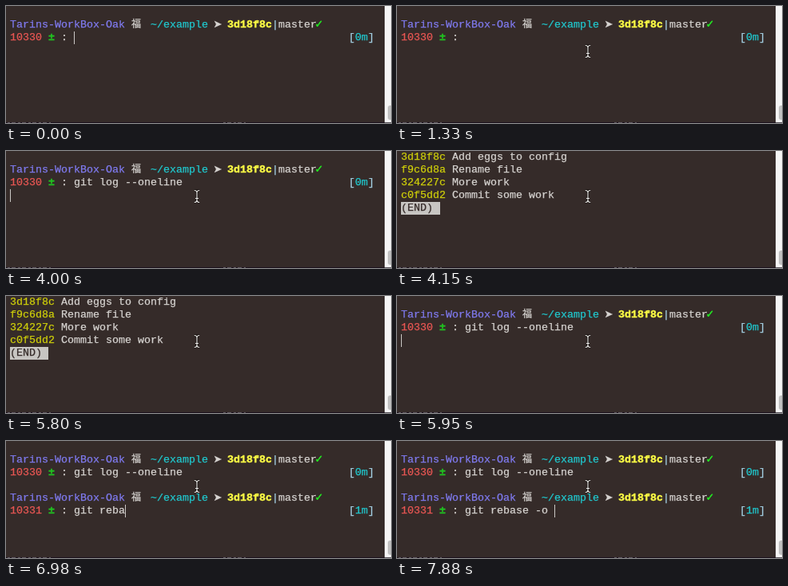
An HTML page that plays this animation: 482x147 px, repeating every 8000 ms.

```html
<!DOCTYPE html>
<html lang="en">
<head>
<meta charset="utf-8">
<title>Terminal session</title>
<style>
  html, body { margin: 0; width: 100%; height: 100%; overflow: hidden; background: #352b29; }
  svg { display: block; width: 482px; height: 147px; }
  text {
    font: 13.333px "Liberation Mono", "Courier New", monospace;
    white-space: pre;
    fill: currentColor;
    stroke: currentColor;
    stroke-width: .25px;
  }
  .bold { font-weight: bold; stroke-width: .4px; }
  .symbol { font: 13px "DejaVu Sans", sans-serif; }
  .cjk { font: 12px "Noto Sans CJK JP", "Noto Sans CJK SC", "Noto Sans CJK", sans-serif; }
</style>
</head>
<body>
<svg viewBox="0 0 482 147">
  <defs>
    <path id="beam" d="M235.8 49.5q3.2 0 3.2 3v9q0 3-3.2 3M242.2 49.5q-3.2 0-3.2 3v9q0 3 3.2 3M237 59.5h4"/>
  </defs>
  <rect width="482" height="147" fill="#352b29"/>
  <g id="screen"></g>
  <rect id="caret" width="1" height="16" fill="#cbc8c5"/>
  <g id="mouse" fill="none">
    <use href="#beam" stroke="#181311" stroke-width="2.8"/>
    <use href="#beam" stroke="#f2f0ee" stroke-width="1.1"/>
  </g>
  <rect y="146" width="474" height="1" fill="#1b111d"/>
  <path d="M2 146.5h54M272 146.5h28" stroke="#5d5660" stroke-dasharray="3 2 5 3"/>
  <rect x="474" width="8" height="147" fill="#f5f5f5"/>
  <rect x="474" width="1" height="147" fill="#e4e3e3"/>
  <rect x="478" y="125" width="8" height="18" rx="3" fill="#c1c1c1"/>
  <rect x="474" y="146" width="8" height="1" fill="#5a555b"/>
</svg>
<script>
const LOOP = 8000, CELL = 8, LINE = 16, LEFT = 5;
const INK = '#d6d3d0', CYAN = '#20c8ce', PALE = '#a5d3e6', HASH = '#cdcd0a';
const FIRST = 'git log --oneline', SECOND = 'git rebase -o ';
const LOG = [
  ['3d18f8c', 'Add eggs to config'],
  ['f9c6d8a', 'Rename file'],
  ['324227c', 'More work'],
  ['c0f5dd2', 'Commit some work']
];
// [time, characters typed]
const TYPE_FIRST = [[2230, 1], [2380, 3], [2530, 4], [2660, 6], [2810, 8], [2960, 10],
  [3260, 12], [3410, 14], [3560, 16], [3700, 17]];
const TYPE_SECOND = [[6390, 1], [6540, 3], [6690, 4], [6840, 6], [6980, 8], [7130, 10],
  [7280, 11], [7580, 12], [7880, 14]];

const byId = id => document.getElementById(id);
const screen = byId('screen'), caret = byId('caret'), mouse = byId('mouse');

function typed(text, steps, t) {
  const done = steps.filter(([at]) => at <= t).pop();
  return text.slice(0, done ? done[1] : 0);
}

function put(col, row, text, color, cls = '') {
  return `<text x="${LEFT + col * CELL}" y="${row * LINE + 11}" color="${color}" class="${cls}">${text}</text>`;
}

function prompt(row, number, minutes, command) {
  return put(0, row, 'Tarins-WorkBox-Oak', '#7f7aee') +
    put(19, row, '福', INK, 'cjk') +
    put(22, row, '~/example', CYAN) +
    put(31.8, row, '➤', INK, 'symbol') +
    put(34, row, '3d18f8c', '#fdfd45', 'bold') +
    put(41, row, '|', PALE) +
    put(42, row, 'master', INK) +
    put(47.7, row, '✓', '#22f522', 'symbol bold') +
    put(0, row + 1, number, '#e65653') +
    put(6, row + 1, '±', '#20c420', 'bold') +
    put(8, row + 1, ':', INK) +
    put(10, row + 1, command, INK) +
    put(53, row + 1, '[', PALE) +
    put(54, row + 1, `${minutes}m`, CYAN) +
    put(56, row + 1, ']', PALE);
}

function pager() {
  const lines = LOG.map(([hash, title], i) => put(0, i, hash, HASH) + put(8, i, title, INK));
  return lines.join('') +
    `<rect x="${LEFT}" y="64" width="48" height="16" fill="#c7c5c2"/>` +
    put(0, 4, '(END)', '#352b29');
}

// Screen content and caret cell at time t; no cell means a hidden caret.
function stateAt(t) {
  if (t >= 4150 && t < 5950) {
    return { html: pager(), cell: t < 5800 ? [6, 4] : null };
  }
  const first = typed(FIRST, TYPE_FIRST, t);
  let html = prompt(1, '10330', 0, first);
  let cell = [10 + first.length, 2];
  if (t >= 1030 && t < 1780) cell = null;
  if (t >= 4000) cell = [0, 3];
  if (t >= 6090) {
    const second = typed(SECOND, TYPE_SECOND, t);
    html += prompt(4, '10331', 1, second);
    cell = [10 + second.length, 5];
  }
  return { html, cell };
}

let shown = '';
function render(t) {
  const { html, cell } = stateAt(t);
  if (html !== shown) screen.innerHTML = shown = html;
  caret.style.display = cell ? '' : 'none';
  if (cell) {
    caret.setAttribute('x', LEFT + cell[0] * CELL);
    caret.setAttribute('y', cell[1] * LINE);
  }
  mouse.style.display = t >= 1330 ? '' : 'none';
}

const start = performance.now();
function tick() {
  render((performance.now() - start) % LOOP);
  requestAnimationFrame(tick);
}
tick();
</script>
</body>
</html>
```
